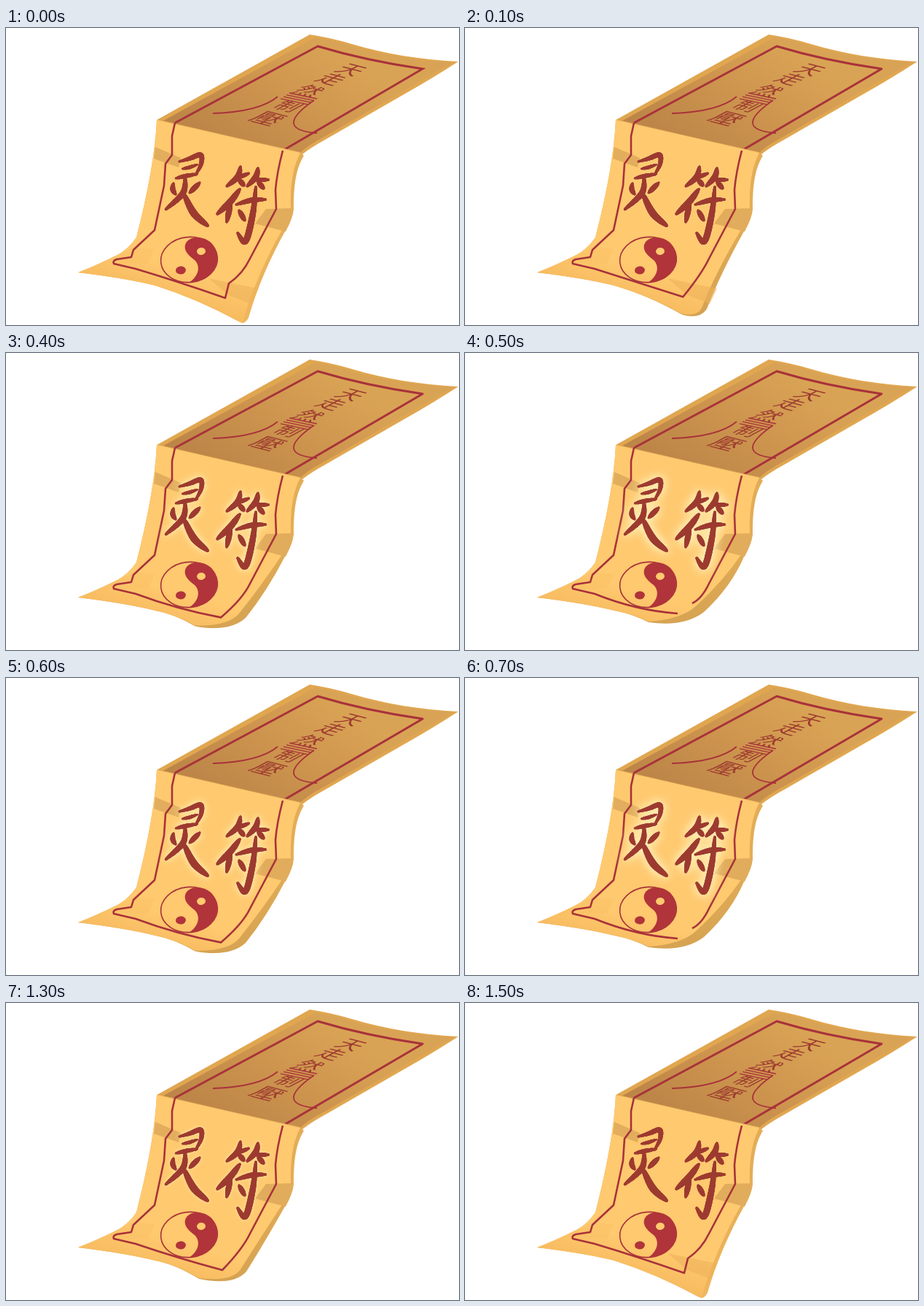
An HTML page with a canvas for the animation above (8 s loop, 622x407 px).

```html
<!DOCTYPE html>
<html lang="zh">
<head>
<meta charset="utf-8">
<title>灵符</title>
<style>
html, body { margin: 0; width: 100%; height: 100%; overflow: hidden; background: #fff; }
canvas { display: block; }
</style>
</head>
<body>
<canvas width="622" height="407" role="img" aria-label="灵符"></canvas>
<script>
const ctx = document.querySelector('canvas').getContext('2d');
const RED = '#a8323a', INK = '#9d3a30', FACE = '#ffc96f';

// Lower right corner: bottom edge, tip, right edge, and the end of the printed frame.
const mix = (a, b, k) => a.map((v, i) => v + (b[i] - v) * k);
const flatCorner = [262, 371, 321, 403, 328, 407, 333, 397, 350, 338, 301, 370];
const bentCorner = [232, 358, 265, 378, 312, 388, 330, 368, 354, 330, 297, 366];
const rolledCorner = [228, 357, 252, 369, 300, 376, 328, 355, 366, 320, 292, 357];

const flat = { curl: 0, corner: flatCorner };
const lifted = { curl: .2, corner: mix(flatCorner, bentCorner, .4) };
const bent = { curl: .4, corner: bentCorner };
const curled = { curl: .7, corner: mix(bentCorner, rolledCorner, .4) };
const rolled = { curl: 1, corner: rolledCorner };

// The corner curls up, wavers, then unrolls; poses change in hard steps.
function poseAt(t) {
  if (t < 100 || t >= 1500) return flat;
  if (t < 200 || t >= 1400) return lifted;
  if (t < 400 || t >= 1300) return bent;
  if (t < 500 || t >= 1200) return curled;
  return t >= 600 && t < 700 ? curled : rolled;
}

// One stroke: greatest width, then x, y pairs; it thins towards both ends.
function stroke(path, w, ...p) {
  const n = p.length / 2;
  const at = (i, k) => p[Math.max(0, Math.min(n - 1, i)) * 2 + k];
  for (let s = 0; s < n - 1; s += .04) {
    const i = Math.floor(s), u = s - i;
    const [x, y] = [0, 1].map(k => {
      const a = at(i - 1, k), b = at(i, k), c = at(i + 1, k), d = at(i + 2, k);
      return b + u / 2 * (c - a + u * (2 * a - 5 * b + 4 * c - d + u * (3 * b - 3 * c + d - a)));
    });
    const r = w * (.2 + .3 * Math.sin(Math.PI * s / (n - 1)));
    path.moveTo(x + r, y);
    path.arc(x, y, r, 0, 7);
  }
}

const ling = new Path2D();
stroke(ling, 7, 238, 183, 252, 179, 267, 174, 268, 186, 260, 202);
stroke(ling, 5, 242, 193, 252, 191, 263, 187);
stroke(ling, 6, 233, 206, 246, 203, 263, 200);
stroke(ling, 7, 230, 213, 229, 221, 233, 228);
stroke(ling, 7, 266, 212, 252, 226);
stroke(ling, 8, 246, 204, 243, 226, 219, 249);
stroke(ling, 10, 244, 227, 258, 254, 277, 271);

const fu = new Path2D();
stroke(fu, 8, 322, 190, 318, 204, 303, 217);
stroke(fu, 6, 313, 207, 334, 199);
stroke(fu, 7, 320, 208, 327, 216);
stroke(fu, 8, 346, 192, 343, 204, 331, 217);
stroke(fu, 6, 340, 208, 361, 208);
stroke(fu, 7, 346, 211, 354, 220);
stroke(fu, 9, 321, 221, 308, 238, 290, 255);
stroke(fu, 8, 309, 238, 306, 252, 303, 266);
stroke(fu, 7, 316, 242, 337, 236, 357, 235);
stroke(fu, 9, 343, 218, 339, 254, 329, 292, 318, 281);
stroke(fu, 7, 320, 250, 328, 264);

const LEFT = 'M207 126Q204 190 179 287Q168 303 153 311Q124 326 99 335Q165 343 205 353';
const FRAME = 'M232 130L228 148V174L219 186L217 216L204 277L175 304L172 314L152 317Q146 319 148 323';

function fill(d, color) {
  ctx.fillStyle = color;
  ctx.fill(d instanceof Path2D ? d : new Path2D(d));
}

function outline(d, width) {
  ctx.strokeStyle = RED;
  ctx.lineWidth = width;
  ctx.stroke(new Path2D(d));
}

function ellipse(x, y, rx, ry) {
  const p = new Path2D();
  p.ellipse(x, y, rx, ry, -.1, 0, 7);
  return p;
}

function ramp(x0, y0, x1, y1, ...colors) {
  const g = ctx.createLinearGradient(x0, y0, x1, y1);
  colors.forEach((c, i) => g.addColorStop(i / (colors.length - 1), c));
  return g;
}

// A character lying on the upper panel.
function lying(text, x, y, size) {
  ctx.save();
  ctx.transform(.97, .25, -.88, .47, x, y);
  ctx.font = `${size}px "Noto Sans CJK SC", "Noto Sans CJK", sans-serif`;
  ctx.textAlign = 'center';
  ctx.textBaseline = 'middle';
  ctx.fillStyle = INK;
  ctx.fillText(text, 0, 0);
  ctx.restore();
}

function topPanel() {
  fill('M207 126L417 9Q445 13 475 22C523 36 568 43 621 46Q582 71 548 90L440 152Q418 164 407 173L214 128Z', '#e0a650');
  fill('M216 127L425 13Q452 17 478 26C523 38 568 44 614 47L437 149Q414 161 404 171Z',
    ramp(290, 155, 400, -5, '#bd8648', '#cd944e', '#d9a355'));
  outline('M232 130L428 25Q495 45 572 56L380 168', 3);
  lying('天', 474, 57, 30);
  lying('走', 447, 70, 30);
  lying('然', 416, 86, 30);
  lying('制', 388, 107, 28);
  lying('壓', 360, 124, 35);
  for (let i = 0; i < 4; i++) outline(`M${389 - i * 4} ${89 + i * 2.6}l38 8`, 1.3);
  outline('M373 94Q348 115 284 117M423 99Q365 139 427 144', 1.8);
}

function frontPanel({ curl, corner }) {
  const [cx, cy, px, py, tx, ty, qx, qy, rx, ry, ex, ey] = corner;
  const inset = 6 + 4 * curl, rise = 9 * curl;
  const side = `Q${cx} ${cy} ${px} ${py}Q${tx} ${ty} ${qx} ${qy}Q${rx} ${ry} 384 277Q394 262 395 248`;
  const face = `Q${cx} ${cy} ${px} ${py - 1}Q${tx - 2} ${ty - 2 - rise} ${qx - inset} ${qy - rise}` +
    `Q${rx - inset} ${ry - rise} 380 275Q390 260 391 248`;
  fill(LEFT + side + 'C395 215 398 193 409 175L404 170Z', ramp(0, 240, 0, 400, '#e3ad57', curl ? '#d3a151' : '#f0b65e'));
  fill(LEFT + face + 'C390 215 394 190 404 171Z', ramp(270, 280, 240, 385, FACE, FACE, '#f6b85c'));
  fill('M205 163L240 178L237 191L203 179Z', '#e2ae5d');
  fill('M357 248L395 247Q392 264 384 279L342 268Z', '#e1ac5b');
  fill('M153 311L174 301L204 303L195 323L148 322L99 335Z', '#f7bd6366');
  if (curl < .3) fill('M278 343L346 357L336 378L305 366Z', '#eeb25a99');

  const turn = curl === 0 ? 'L306 350' : curl === 1 ? 'M312 343' : '';
  ctx.lineJoin = 'round';
  outline(`${FRAME}L178 330Q235 ${347 + 6 * curl} ${ex} ${ey}${turn}Q325 337 335 316L371 248L370 222Q372 198 380 168`, 2.6);

  ctx.strokeStyle = RED;
  ctx.lineWidth = 1.6;
  ctx.stroke(ellipse(251.5, 317.5, 39, 31));
  fill('M263 287C282 288 291 302 290 318C288 336 272 348 251 349C264 341 268 327 259 318C248 310 242 302 248 293Q253 287 263 287Z', '#b0343a');
  fill(ellipse(268, 306, 6, 5), FACE);
  fill(ellipse(240, 332, 7, 5.5), '#b0343a');

  ctx.shadowColor = `rgba(255,244,190,${curl})`;
  ctx.shadowBlur = 14 * curl;
  for (const glyph of [ling, fu, ling, fu]) fill(glyph, INK);
  ctx.shadowColor = 'transparent';
  fill(ling, INK);
  fill(fu, INK);
}

const start = performance.now();
let shown;
function tick() {
  const pose = poseAt((performance.now() - start) % 8000);
  if (pose !== shown) {
    shown = pose;
    ctx.clearRect(0, 0, 622, 407);
    topPanel();
    frontPanel(pose);
  }
  requestAnimationFrame(tick);
}
tick();
</script>
</body>
</html>
```
